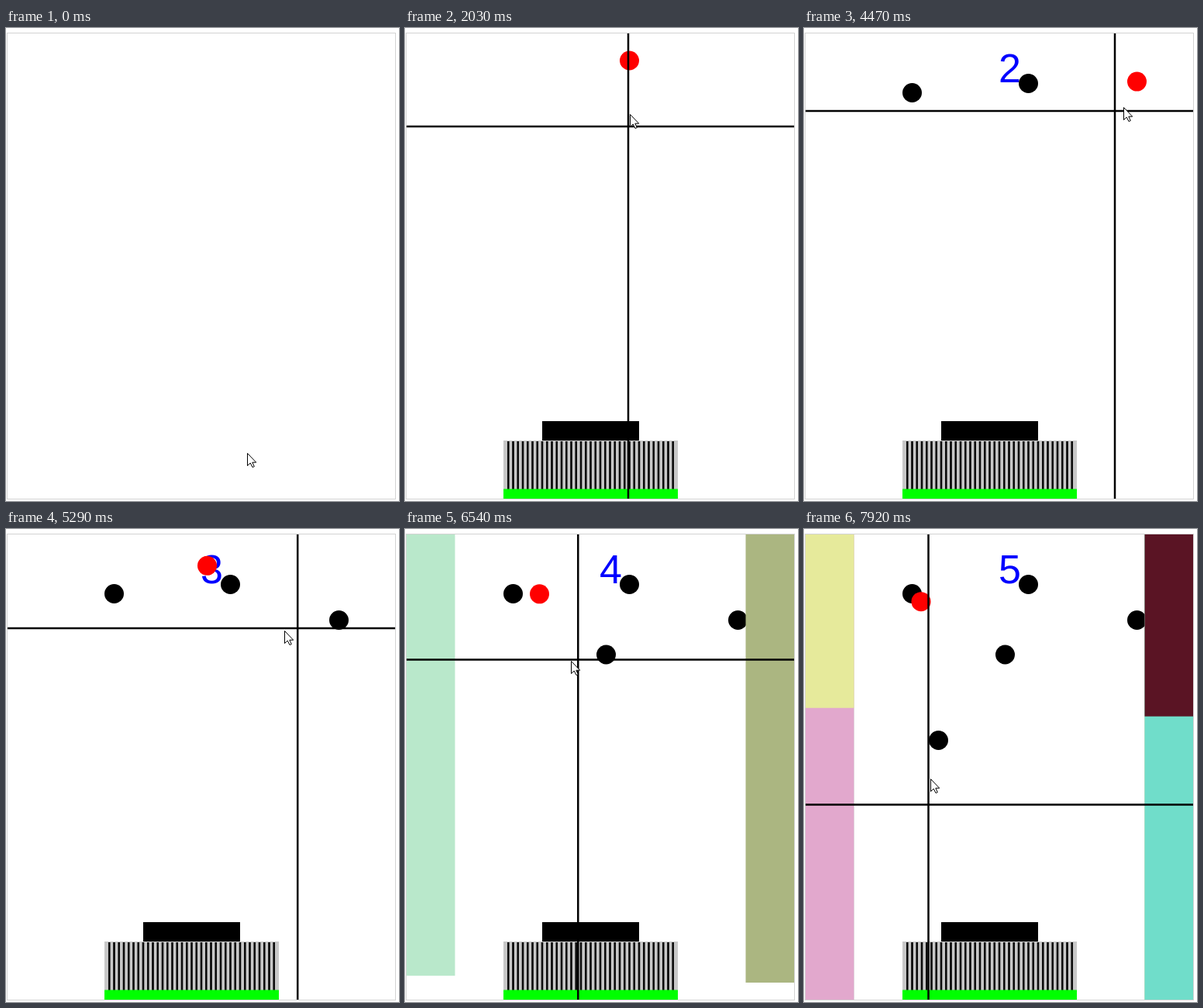
Write an HTML page that moves like this. It is 507x610 px and loops after 7.99 s.

```html
<!DOCTYPE html>
<html lang="en">
<head>
<meta charset="utf-8">
<title>Ball shooter</title>
<style>
  html, body { margin: 0; width: 100%; height: 100%; overflow: hidden; background: #fff; }
  svg { display: block; }
  text { font: 52px "Liberation Sans", Arial, sans-serif; fill: #00f; }
</style>
</head>
<body>
<svg width="507" height="610" viewBox="0 0 507 610">
  <defs>
    <clipPath id="field"><rect x="2" y="7" width="500" height="600"/></clipPath>
    <pattern id="stripes" x="130.125" width="6.25" height="63" patternUnits="userSpaceOnUse">
      <rect x="1.875" width="2.5" height="63"/>
    </pattern>
  </defs>
  <rect x="1.5" y="6.5" width="501" height="601" fill="#fff" stroke="#d3d3d3"/>
  <g id="game" clip-path="url(#field)">
    <text id="score" x="251" y="70"></text>
    <g id="balls"></g>
    <g id="panels"></g>
    <rect x="177" y="507" width="125" height="25"/>
    <rect x="127" y="532" width="225" height="63" fill="#c8c8c8"/>
    <rect x="130.125" y="533" width="218.75" height="62" fill="url(#stripes)"/>
    <rect x="127" y="594.5" width="225" height="12.5" fill="#0f0"/>
    <path id="cross" stroke="#000" stroke-width="2.5"/>
  </g>
  <path id="cursor" d="M.5 .5V16.5L4.2 13L7 18.5L9.3 17.5L6.8 12.2H11.7Z" fill="#fff" stroke="#000"/>
  <circle id="press" r="15" fill="#ff0" fill-opacity=".5"/>
</svg>
<script>
const LOOP = 7990, START = 1110, STEP = 69.4, LAG = 100, TOP = 7, HEIGHT = 600;
const BALL_SPEED = 38.8, PANEL_START = 5383, PANEL_LEAD = 16;

const $ = id => document.getElementById(id);
function set(el, attrs) {
  for (const k in attrs) el.setAttribute(k, attrs[k]);
}
function add(parent, tag, attrs) {
  const el = document.createElementNS('http://www.w3.org/2000/svg', tag);
  set(el, attrs);
  return parent.appendChild(el);
}
const show = (el, on) => set(el, { visibility: on ? 'visible' : 'hidden' });

// Release time, x, height where it is shot; each ball falls faster than the last
const balls = [
  [START, 289.5, 71.5], [2842, 139.5, 83.5], [3908, 429.5, 117.5],
  [5014, 259.5, 162], [6127, 173.5, 272.5], [7539, 151, 300]
].map(([start, x, stop], i) => {
  const speed = BALL_SPEED * (i + 1) / 1000;
  return {
    start, x, stop, speed,
    hit: start + (stop - TOP) / speed,
    el: add($('balls'), 'circle', { cx: x, r: 12.5 })
  };
});

const sides = [
  { x: 2, lead: 0, colors: ['#b9e8cb', '#e2a8cd', '#e6ea9b'] },
  { x: 439.5, lead: PANEL_LEAD, colors: ['#abb681', '#70ddca', '#5a1424'] }
];
for (const side of sides) {
  side.els = side.colors.map(fill =>
    add($('panels'), 'rect', { x: side.x, y: TOP, width: 62.5, height: 0, fill }));
}

// One sweep towards each ball: time, x, y and the distance the crosshair trails behind
const sweeps = [
  [2012, 290, 111, -2, 16], [3261, 152, 72, 36, 8.5], [4441, 412, 102, -11, 5],
  [5968, 256, 164, 3.5, -13], [7078, 174, 187, 0.3, -10], [7911, 163, 322, -2.5, 33.5]
];
const path = [
  [0, 311, 548],
  ...sweeps.flatMap(([t, x, y, dx, dy]) => [[t - LAG, x + dx, y + dy], [t, x, y]]),
  ...balls.map(b => [b.hit, b.x, b.stop])
].sort((a, b) => a[0] - b[0]);

function pointer(t) {
  const i = path.findIndex(p => p[0] > t);
  const [t0, x0, y0] = path[i - 1], [t1, x1, y1] = path[i];
  const f = (t - t0) / (t1 - t0);
  return [x0 + (x1 - x0) * f, y0 + (y1 - y0) * f];
}

// Accelerating fall of the side panels
function fallen(ms) {
  const s = Math.max(0, ms / 1000);
  return 446.6 * s + 46.1 * s * s;
}

function draw(now) {
  const playing = now >= START;
  show($('game'), playing);
  show($('cursor'), playing || now < 70);
  show($('press'), false);
  if (!playing) {
    set($('cursor'), { transform: 'translate(311 548)' });
    return;
  }
  const t = START + STEP * Math.floor((now - START) / STEP);
  const [x, y] = pointer(t), [cx, cy] = pointer(t - LAG);
  set($('cursor'), { transform: `translate(${Math.round(x)} ${Math.round(y)})` });
  set($('cross'), { d: `M${cx} 7V607M2 ${cy}H502` });

  for (const b of balls) {
    show(b.el, t >= b.start);
    set(b.el, {
      cy: Math.min(b.stop, TOP + b.speed * (t - b.start)),
      fill: t >= b.hit ? '#000' : '#f00'
    });
  }
  $('score').textContent = balls.filter(b => t >= b.hit).length || '';

  for (const { lead, els } of sides) {
    const fall = fallen(t - PANEL_START + lead);
    els.forEach((el, i) =>
      set(el, { height: Math.min(HEIGHT, Math.max(0, fall - HEIGHT * i)) }));
  }

  show($('press'), balls.some(b => t > b.hit - 120 && t < b.hit + 30));
  set($('press'), { cx: x, cy: y + 1 });
}

const begin = performance.now();
function frame() {
  draw((performance.now() - begin) % LOOP);
  requestAnimationFrame(frame);
}
frame();
</script>
</body>
</html>
```
